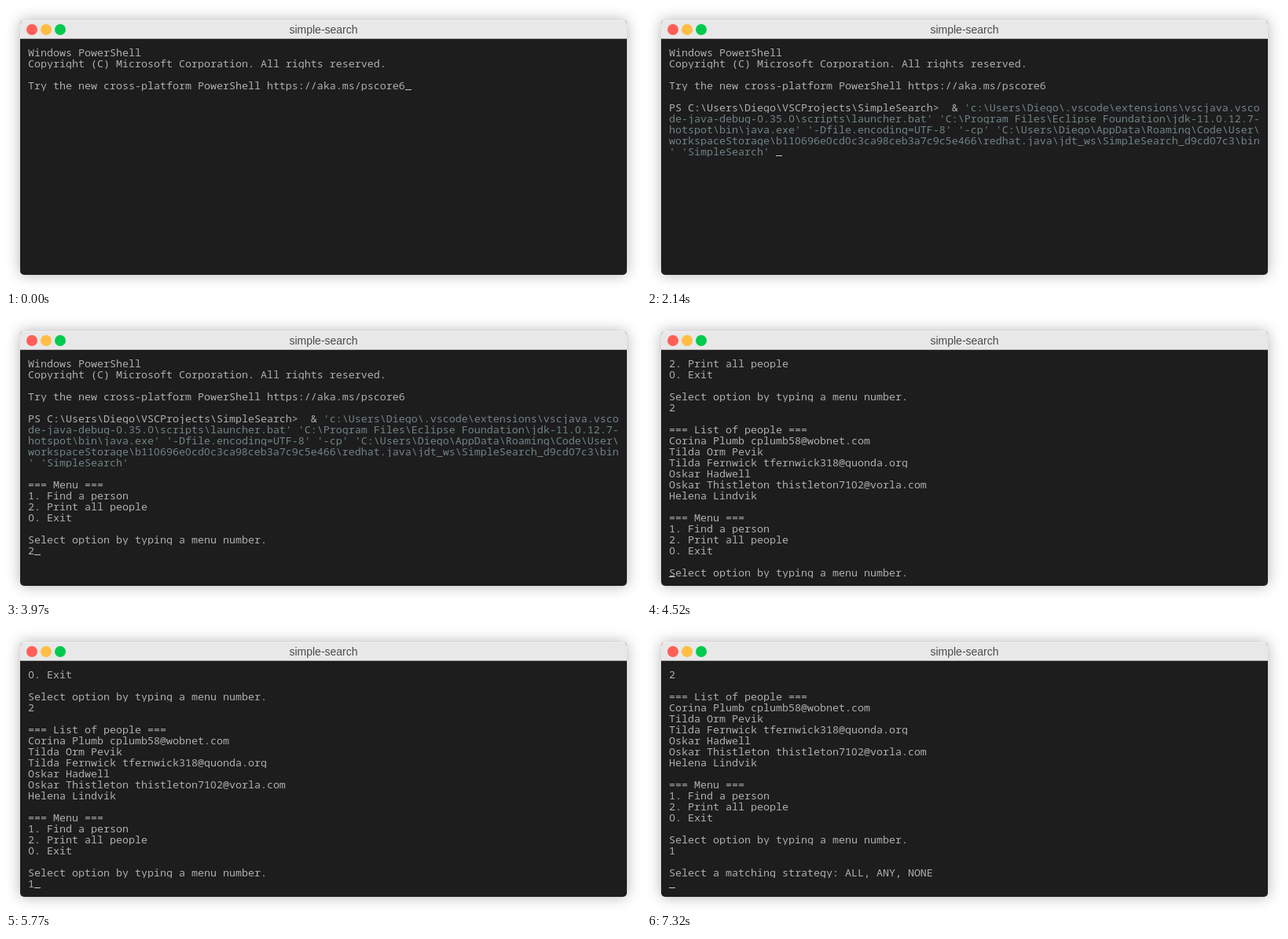
An HTML page for the animation above (8 s loop, 808 by 360 pixels).

```html
<!DOCTYPE html>
<html lang="en">
<head>
<meta charset="utf-8">
<title>simple-search</title>
<style>
  html, body { margin: 0; width: 808px; height: 360px; overflow: hidden; background: #fff; }
  .window {
    position: absolute; left: 18px; top: 18px; width: 772px; height: 324px;
    border-radius: 5px; overflow: hidden; background: #1d1d1d;
  }
  .shadow {
    position: absolute; left: 18px; top: 18px; width: 772px; height: 324px;
    border-radius: 5px; box-shadow: 0 0 18px rgba(0, 0, 0, .3);
  }
  .bar {
    box-sizing: border-box; height: 24px; background: #e8e8e8;
    border-top: 1px solid #f3f1f3; border-bottom: 1px solid #b1aeb1;
    font: 14px/22px "Liberation Sans", Arial, sans-serif;
    color: #4d494d; text-align: center;
  }
  .dot { position: absolute; top: 5px; width: 14px; height: 14px; border-radius: 50%; }
  #screen {
    position: absolute; left: 10px; top: 34px; width: 756px; height: 280px;
    font: 13.3333px/14px "Noto Sans Mono", "DejaVu Sans Mono", monospace;
    color: #afafaf; white-space: pre;
  }
  /* Each row cuts off its own descenders */
  .row { height: 14px; overflow: hidden; }
  .row b { font-weight: normal; color: #708387; }
  /* Plain zero without a slash */
  .row i { display: inline-block; width: .6em; text-align: center; font-family: "Noto Sans", sans-serif; font-style: normal; }
  #cursor { position: absolute; left: 0; top: 0; width: 8px; height: 1px; background: #c7c7c7; }
</style>
</head>
<body>
<div class="shadow"></div>
<div class="window">
  <div class="bar">simple-search</div>
  <div class="dot" style="left:8px;background:#ff5f58"></div>
  <div class="dot" style="left:26px;background:#ffbd44"></div>
  <div class="dot" style="left:44px;background:#00ca4e"></div>
  <div id="screen"><div id="cursor"></div></div>
</div>
<script>
const LOOP = 8000, ROWS = 20, COLS = 94, CELL_W = 8, CELL_H = 14;

const prompt = String.raw`PS C:\Users\Diego\VSCProjects\SimpleSearch>  & `;
const command = String.raw`'c:\Users\Diego\.vscode\extensions\vscjava.vscode-java-debug-0.35.0\scripts\launcher.bat' 'C:\Program Files\Eclipse Foundation\jdk-11.0.12.7-hotspot\bin\java.exe' '-Dfile.encoding=UTF-8' '-cp' 'C:\Users\Diego\AppData\Roaming\Code\User\workspaceStorage\b110696e0cd0c3ca98ceb3a7c9c5e466\redhat.java\jdt_ws\SimpleSearch_d9cd07c3\bin' 'SimpleSearch' `;

const menu = [
  '', '=== Menu ===', '1. Find a person', '2. Print all people', '0. Exit',
  '', 'Select option by typing a menu number.'
];

const lines = [
  'Windows PowerShell',
  'Copyright (C) Microsoft Corporation. All rights reserved.',
  '',
  'Try the new cross-platform PowerShell https://aka.ms/pscore6',
  '',
  ...(prompt + command).match(new RegExp(`.{1,${COLS}}`, 'g')),
  ...menu, '2',
  '', '=== List of people ===',
  'Corina Plumb cplumb58@wobnet.com',
  'Tilda Orm Pevik',
  'Tilda Fernwick tfernwick318@quonda.org',
  'Oskar Hadwell',
  'Oskar Thistleton thistleton7102@vorla.com',
  'Helena Lindvik',
  ...menu, '1',
  '', 'Select a matching strategy: ALL, ANY, NONE',
  ''
];
const CMD_FIRST = 5, CMD_LAST = 9;

// [time, last line, characters shown on it, cursor column]
const steps = [
  [0, 3, 60, 60],
  [100, 5, 0, 0],
  [250, 5, 44, 44],
  [1790, 5, 47, 47],
  [1890, 5, 68, 68],
  [2040, 7, 60, 60],
  [2140, 9, 17, 17],
  [2500, 10, 0, 0],
  [2710, 16, 38, 0],
  [2730, 17, 0, 0],
  [3970, 17, 1, 1],
  [4520, 32, 38, 0],
  [4620, 33, 0, 0],
  [5770, 33, 1, 1],
  [7220, 35, 42, 0],
  [7320, 36, 0, 0]
];

const screen = document.getElementById('screen');
const cursor = document.getElementById('cursor');
const rows = Array.from({ length: ROWS }, () => {
  const row = document.createElement('div');
  row.className = 'row';
  screen.append(row);
  return row;
});

const markup = text => text
  .replace(/&/g, '&amp;').replace(/>/g, '&gt;').replace(/0/g, '<i>0</i>');

function lineMarkup(n, count) {
  const text = lines[n].slice(0, count);
  const plain = n === CMD_FIRST ? prompt.length : n > CMD_FIRST && n <= CMD_LAST ? 0 : COLS;
  return markup(text.slice(0, plain)) + `<b>${markup(text.slice(plain))}</b>`;
}

function draw([, last, count, col]) {
  const top = Math.max(0, last - ROWS + 1);
  rows.forEach((row, i) => {
    const n = top + i;
    row.innerHTML = n > last ? '' : lineMarkup(n, n === last ? count : COLS);
  });
  cursor.style.transform =
    `translate(${col * CELL_W}px, ${(last - top + 1) * CELL_H - 2}px)`;
}

const start = performance.now();
let shown = null;

function tick() {
  const t = (performance.now() - start) % LOOP;
  const step = steps.findLast(s => s[0] <= t);
  if (step !== shown) draw(shown = step);
  requestAnimationFrame(tick);
}
tick();
</script>
</body>
</html>
```
